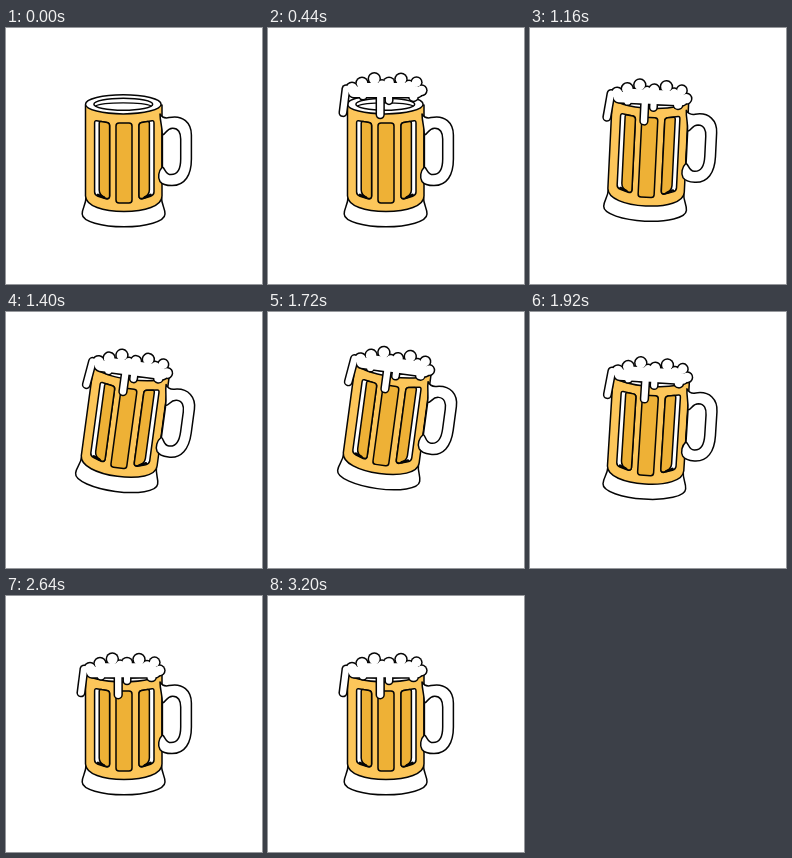
Animation of 256 by 256 pixels, one loop 3.24 s. Source, as an HTML page with a canvas:

```html
<!DOCTYPE html>
<html lang="en">
<head>
<meta charset="utf-8">
<title>Beer mug</title>
<style>
  html, body { margin: 0; width: 100%; height: 100%; overflow: hidden; background: #fff; }
  canvas { display: block; width: 256px; height: 256px; }
</style>
</head>
<body>
<canvas id="stage"></canvas>
<script>
const LOOP = 3240;
const INK = '#050505', WHITE = '#fff', BEER = '#fcc65a', GLASS = '#eeb136';
const LINE = 1.5;

const canvas = document.getElementById('stage');
const scale = Math.max(1, window.devicePixelRatio || 1);
canvas.width = canvas.height = Math.round(256 * scale);
const ctx = canvas.getContext('2d');

function shape(d, fill, width = LINE) {
  const path = new Path2D(d);
  if (fill) { ctx.fillStyle = fill; ctx.fill(path); }
  ctx.strokeStyle = INK;
  ctx.lineWidth = width;
  ctx.stroke(path);
}

function oval(x, y, rx, ry, fill) {
  ctx.beginPath();
  ctx.ellipse(x, y, rx, ry, 0, 0, Math.PI * 2);
  ctx.fillStyle = fill;
  ctx.fill();
  ctx.strokeStyle = INK;
  ctx.lineWidth = LINE;
  ctx.stroke();
}

function sidePanel() {
  shape('M90.5 92.7 L101 94.4 Q103.6 95 103.6 97.5 V168 Q103.6 171.6 100 170.8 L92 168.2 Q88.6 167 88.6 164 V95 Q88.6 92.4 90.5 92.7Z', WHITE);
  shape('M95 93.6 L101 94.4 Q103.6 95 103.6 97.5 V168 Q103.6 171.2 100 170.4 Q93.2 167.5 93.2 162 V95.5 Q93.2 93.4 95 93.6Z', GLASS);
  shape('M92 166.8 L98 169.4', null, 2.4);
}

function handle() {
  shape('M154 86 Q157 91 163 89.6 C177 86.5 185.4 95 185.4 107 V131 C185.4 147 179 157.6 166 157.6 C160 157.6 156.5 157 154 153.5 C151.5 149.5 152.5 143 156.3 139 V107 C156.5 99 154 94 154 86Z', WHITE);
  shape('M156.4 107 C160.5 106 160 100.6 166.5 100.2 C172.5 100 174.7 105 174.7 111 V131 C174.7 142 171.5 146.6 165 146.6 C159.5 146.6 159.5 141 156.4 139Z', WHITE);
}

function mug() {
  // base
  shape('M80 169 C80 177 76.2 179.5 76.2 186 C76.2 193.5 96 198.8 118 198.8 C140 198.8 159 193.5 159 186 C159 179.5 155.5 177 155.5 169Z', WHITE);
  // body
  shape('M79.5 77 V168 C80 178 97 183.6 118 183.6 C139 183.6 156 178 156 168 V77Z', BEER);
  sidePanel();
  ctx.save();
  ctx.translate(236.6, 0);
  ctx.scale(-1, 1);
  sidePanel();
  ctx.restore();
  shape('M113 95 H123 Q126 95 126 98 V172 Q126 175 123 175 H113 Q110 175 110 172 V98 Q110 95 113 95Z', GLASS);
  handle();
  // rim
  oval(117.3, 76.3, 37.8, 9.6, WHITE);
  oval(117.3, 76.2, 29.4, 6, WHITE);
  shape('M89.5 78 C97 73.8 137 73.8 145.2 78', null, 1.1);
}

const bumps = [
  [84, 72.5, 6], [94, 67.5, 6], [106.3, 63, 6], [114, 69, 5], [121, 67, 5.6],
  [133, 63.5, 6], [141, 69.5, 5], [148.5, 66.5, 5.4], [153.5, 74.5, 5.4], [145.5, 80.8, 4.8]
];
// x1, y1, x2, y2, radius
const strands = [
  [86, 76, 149, 76, 6], [96, 71, 144, 71, 4.5], [78, 73, 75, 96.8, 3.8],
  [95, 76, 95, 80, 4], [112.2, 78, 112.2, 98.8, 3.9], [121, 76, 121, 84.8, 3.8]
];

function foamLayer(color, grow) {
  ctx.fillStyle = ctx.strokeStyle = color;
  for (const [x, y, r] of bumps) {
    ctx.beginPath();
    ctx.arc(x, y, r + grow, 0, Math.PI * 2);
    ctx.fill();
  }
  for (const [x1, y1, x2, y2, r] of strands) {
    ctx.lineWidth = 2 * (r + grow);
    ctx.beginPath();
    ctx.moveTo(x1, y1);
    ctx.lineTo(x2, y2);
    ctx.stroke();
  }
}

function foam() {
  foamLayer(INK, LINE / 2);
  foamLayer(WHITE, -LINE / 2);
}

const smooth = p => (1 - Math.cos(Math.PI * Math.min(1, Math.max(0, p)))) / 2;
const swell = (t, peak, half) => smooth(1 - Math.abs(t - peak) / half);

function draw(t) {
  ctx.setTransform(scale, 0, 0, scale, 0, 0);
  ctx.fillStyle = WHITE;
  ctx.fillRect(0, 0, 256, 256);
  ctx.lineCap = ctx.lineJoin = 'round';

  const lift = -23.8 * swell(t, 1595, 640);
  const tilt = 9 * swell(t, 1560, 640) * Math.PI / 180;
  ctx.translate(118, 134 + lift);
  ctx.rotate(tilt);
  ctx.translate(-118, -134);
  mug();

  if (t >= 80) {
    ctx.translate(0, -106 * (1 - smooth((t - 20) / 540)));
    foam();
  }
}

const start = performance.now();
function tick() {
  draw((performance.now() - start) % LOOP);
  requestAnimationFrame(tick);
}
draw(0);
requestAnimationFrame(tick);
</script>
</body>
</html>
```
